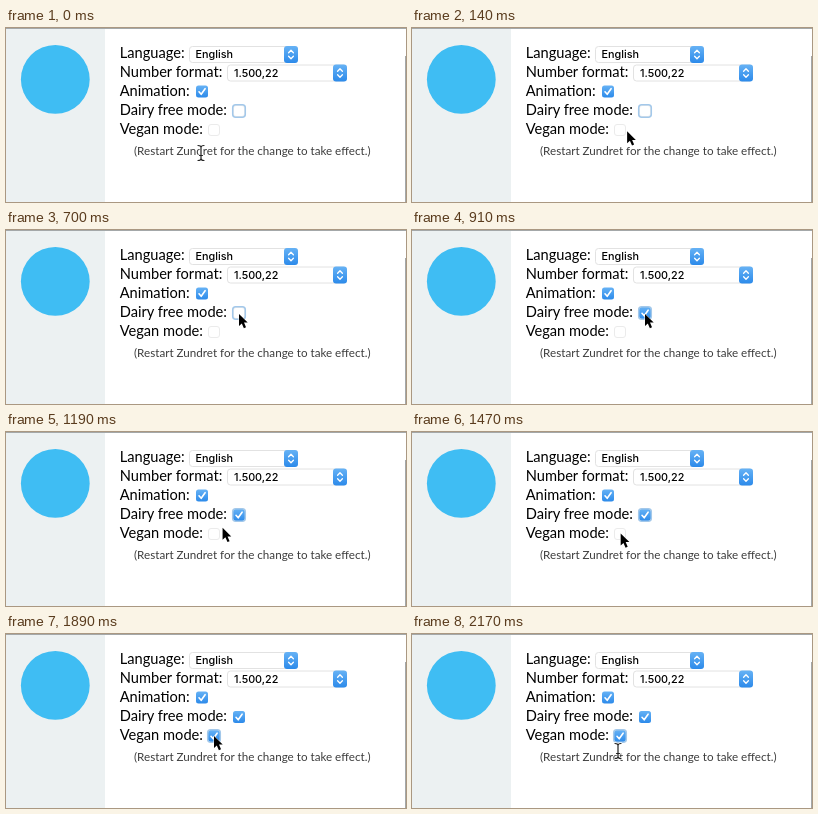
Write an HTML page that moves like this. It is 400 by 174 pixels and loops after 2240 ms.

```html
<!DOCTYPE html>
<html lang="en">
<head>
<meta charset="utf-8">
<title>Preferences</title>
<style>
  html, body { margin: 0; width: 100%; height: 100%; overflow: hidden; background: #fff; }
  svg { display: block; width: 400px; height: 174px; }
  .label { font: 14.65px Lato, sans-serif; fill: #000; }
  .hint { font: 11.65px Lato, sans-serif; fill: #3c3c3c; }
  .value { font: 500 10.8px Inter, sans-serif; fill: #000; }
  .tick { fill: none; stroke: #fff; stroke-width: 1.6; stroke-linecap: round; stroke-linejoin: round; }
  .beam { fill: none; stroke-linecap: round; }
</style>
</head>
<body>
<svg viewBox="0 0 400 174">
  <defs>
    <linearGradient id="blue" x2="0" y2="1">
      <stop stop-color="#66b2f5"/>
      <stop offset="1" stop-color="#2c8aea"/>
    </linearGradient>
    <g id="checked">
      <rect width="12" height="12" rx="2.5" fill="url(#blue)"/>
      <path class="tick" d="M3 6.3 5.2 8.8 9.1 3.2"/>
    </g>
    <rect id="ring" x="-.3" y="-.3" width="12.6" height="12.6" rx="3" fill="none" stroke="#a3c8ea" stroke-width="1.5"/>
    <rect id="empty" x=".5" y=".5" width="11" height="11" rx="2.5" fill="#fff" stroke="#ebebeb"/>
    <g id="stepper">
      <rect width="14" height="17" rx="3" fill="url(#blue)"/>
      <path class="tick" style="stroke-width:1.3" d="M4.6 6.8 7 4.3 9.4 6.8M4.6 10.2 7 12.7 9.4 10.2"/>
    </g>
    <path id="stem" d="M-3-7.5Q0-7.5 0-5.5Q0-7.5 3-7.5M0-5.5V5.5M-3 7.5Q0 7.5 0 5.5Q0 7.5 3 7.5M-1.5 2.5H1.5"/>
  </defs>

  <rect width="400" height="174" fill="#fff"/>
  <rect width="99" height="174" fill="#ecf1f2"/>
  <path d="M0 .5H400M399.5 28V174" stroke="#a4a8a9"/>
  <circle cx="49.3" cy="51.4" r="34.4" fill="#3fbdf3"/>

  <g class="label">
    <text x="113.7" y="30">Language:</text>
    <text x="113.7" y="49">Number format:</text>
    <text x="113.7" y="68">Animation:</text>
    <text x="113.7" y="87">Dairy free mode:</text>
    <text x="113.7" y="106">Vegan mode:</text>
  </g>
  <text class="hint" x="128" y="127">(Restart Zundret for the change to take effect.)</text>

  <g fill="#fff" stroke="#e2e2e2">
    <rect x="183.5" y="18.5" width="108" height="16" rx="3"/>
    <rect x="221.5" y="37" width="119" height="16" rx="3"/>
  </g>
  <text class="value" x="189.5" y="30.3">English</text>
  <text class="value" x="228" y="49.2">1.500,22</text>
  <use href="#stepper" x="278" y="18"/>
  <use href="#stepper" x="327" y="36.5"/>

  <use href="#checked" x="190" y="57.5"/>
  <g transform="translate(227 77)">
    <use href="#empty"/>
    <use href="#checked" id="dairyTick"/>
    <use href="#ring" id="dairyFocus"/>
  </g>
  <g transform="translate(202 96)">
    <use href="#empty"/>
    <use href="#checked" id="veganTick"/>
    <use href="#ring" id="veganFocus"/>
  </g>

  <g id="pointer">
    <g id="beam" class="beam">
      <use href="#stem" stroke="#fff" stroke-width="2.6"/>
      <use href="#stem" stroke="#222" stroke-width="1.2"/>
    </g>
    <path id="arrow" d="M0 0V12L2.8 9.4 4.9 14.2 7 13.3 5 8.6H8.7Z" fill="#000" stroke="#fff" paint-order="stroke"/>
  </g>
</svg>
<script>
  const LOOP = 2240, STEP = 70, FADE = 140;
  const START = { x: 195, y: 125 };
  const MOVES = [
    { from: 0, to: 630, x: 233, y: 84 },
    { from: 980, to: 1680, x: 208, y: 102 },
    { from: 2030, to: 2170, x: 206, y: 117 }
  ];
  const DAIRY_CLICK = 700, VEGAN_CLICK = 1750;
  const HINT_TOP = 110;

  const part = id => document.getElementById(id);
  const progress = (t, from, to) => Math.min(1, Math.max(0, (t - from) / (to - from)));
  const easeOut = p => 1 - (1 - p) ** 3;
  const fadeIn = (t, from) => progress(t, from, from + FADE);
  const show = (id, amount) => part(id).setAttribute('opacity', amount);

  function pointerAt(t) {
    return MOVES.reduce((at, move) => {
      const p = easeOut(progress(t, move.from, move.to));
      return { x: at.x + (move.x - at.x) * p, y: at.y + (move.y - at.y) * p };
    }, START);
  }

  function draw() {
    const t = Math.floor(performance.now() % LOOP / STEP) * STEP;
    const { x, y } = pointerAt(t);
    const overText = y > HINT_TOP;
    part('pointer').setAttribute('transform', `translate(${x} ${y})`);
    show('beam', +overText);
    show('arrow', +!overText);

    const vegan = fadeIn(t, VEGAN_CLICK);
    show('dairyTick', fadeIn(t, DAIRY_CLICK));
    show('dairyFocus', 1 - vegan);
    show('veganTick', vegan);
    show('veganFocus', vegan);
    requestAnimationFrame(draw);
  }
  draw();
</script>
</body>
</html>
```
